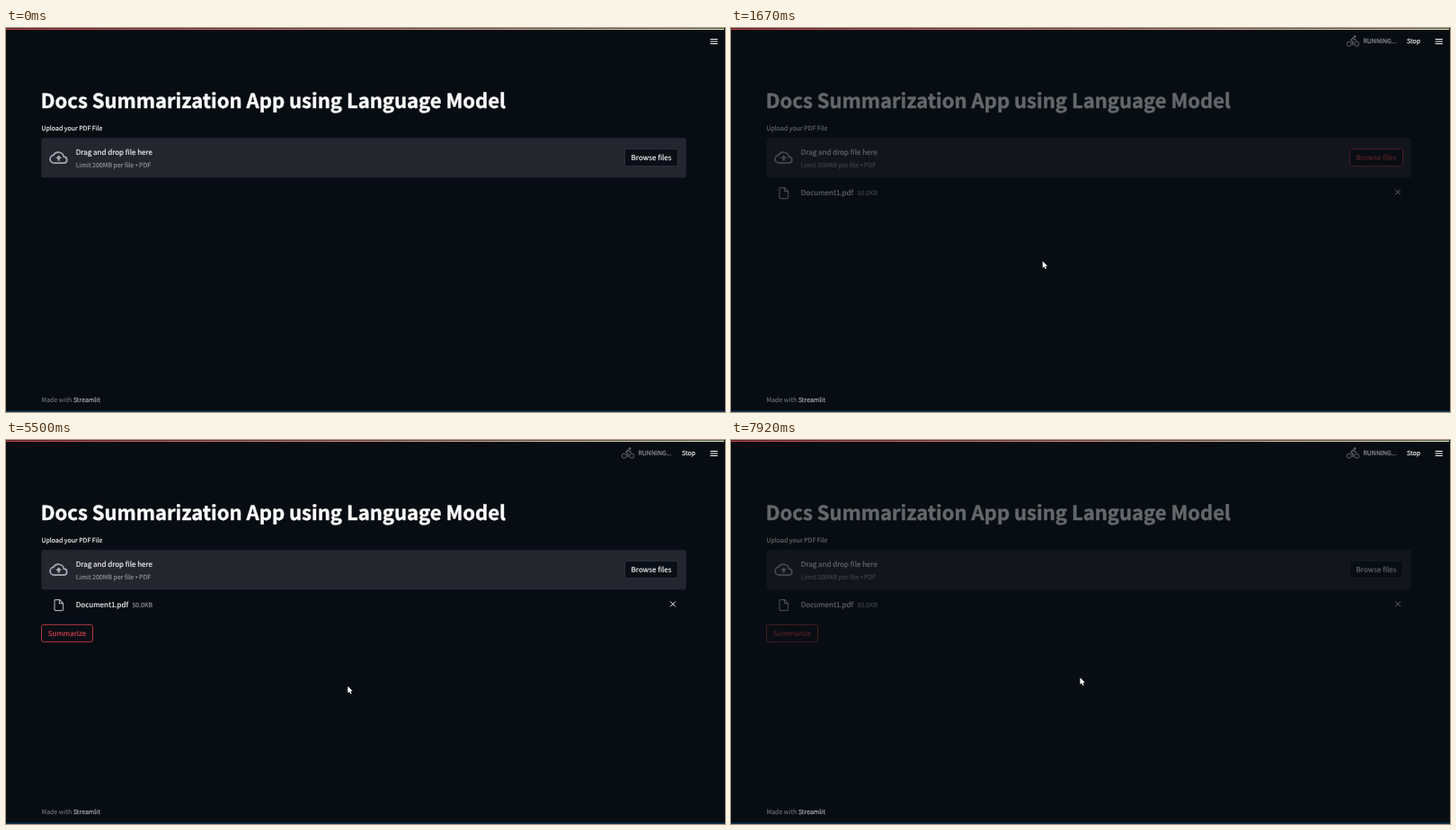
Write an HTML page with a canvas that moves like this. It is 800 px wide and 427 px high and loops after 8000 ms.

```html
<!DOCTYPE html>
<html lang="en">
<head>
<meta charset="utf-8">
<title>Docs Summarization App</title>
<style>
  html, body { margin: 0; width: 100%; height: 100%; overflow: hidden; background: #080d13; }
  canvas { display: block; width: 800px; height: 427px; }
</style>
</head>
<body>
<canvas id="stage" width="800" height="427"></canvas>
<script>
const ctx = document.getElementById('stage').getContext('2d');
const LOOP = 8000;
const FAMILY = '"Noto Sans CJK JP", "Noto Sans CJK SC", "Noto Sans CJK KR", "Noto Sans CJK", "Open Sans", sans-serif';
const BG = '#080d13', WHITE = '#fafafa', MUTED = '#96989d', RED = '#d8434a', ICON = '#a6a9b0', SPORT = '#6c6e73';
const BODY = 8.03, SMALL = 6.99, TITLE = 22.03;

// Times in ms
const FOCUS = 330, UPLOADED = 860, READY = 3540, HOVER = 4260, CLICKED = 4700;

// Pointer keys: time, x, y
const POINTER = [
  [120, 640, 236], [330, 717, 147], [420, 717, 147], [740, 387, 211], [770, 387, 211],
  [930, 346.7, 259.2], [3700, 346.7, 259.2], [4270, 69, 215], [5150, 69, 215],
  [5460, 380.3, 273.8], [5560, 380.3, 273.8], [5980, 388.4, 264.3], [LOOP, 388.4, 264.3]
];

const clamp = v => Math.max(0, Math.min(1, v));
const progress = (t, from, to) => clamp((t - from) / (to - from));
const smooth = k => k * k * (3 - 2 * k);

// A hairline outline gives the letters a slightly heavier weight
function text(str, x, y, size, color, { weight = 400, align = 'left' } = {}) {
  ctx.font = `${weight} ${size}px ${FAMILY}`;
  ctx.textAlign = align;
  ctx.fillStyle = ctx.strokeStyle = color;
  ctx.lineWidth = size * 0.02;
  ctx.lineJoin = 'round';
  ctx.fillText(str, x, y);
  ctx.strokeText(str, x, y);
}

function dot(x, y, r, color) {
  ctx.fillStyle = color;
  ctx.beginPath();
  ctx.arc(x, y, r, 0, Math.PI * 2);
  ctx.fill();
}

function box(x, y, w, h, fill, border) {
  ctx.beginPath();
  ctx.roundRect(x, y, w, h, 2.2);
  ctx.fillStyle = fill;
  ctx.fill();
  if (border) {
    ctx.lineWidth = 0.8;
    ctx.strokeStyle = border;
    ctx.stroke();
  }
}

function button(label, x, y, w, active) {
  box(x, y, w, 19, '#0a0f16', active ? RED : '#34363e');
  text(label, x + w / 2, y + 12.7, BODY, active ? RED : WHITE, { align: 'center' });
}

// Draws stroked and filled paths in icon units
function icon(x, y, scale, color, width, lines, solid) {
  ctx.save();
  ctx.translate(x, y);
  ctx.scale(scale, scale);
  ctx.lineJoin = 'miter';
  ctx.lineWidth = width;
  ctx.strokeStyle = ctx.fillStyle = color;
  ctx.stroke(new Path2D(lines));
  if (solid) ctx.fill(new Path2D(solid));
  ctx.restore();
}

function runner() {
  icon(685.2, 7.5, 0.6, SPORT, 2,
    'M6 12.6V8.5L11 6.5l1.5.2 1.8 2.8c1 1.5 2.7 2.4 4.7 2.4M11.8 7l-1.5 6.5-1.2 6.7-6-1.2M10.8 13l3.2 3v7');
  dot(693.3, 9.6, 1.25, SPORT);
}

function cyclist() {
  icon(684.8, 7.5, 0.6, SPORT, 1.9,
    'M19 10c-2 0-3.4-.8-4.4-1.8L12.2 6 8.5 9.8l3.5 3.4V19');
  icon(684.8, 7.5, 0.6, SPORT, 1.5,
    'M9.2 17a4.2 4.2 0 1 1-8.4 0 4.2 4.2 0 1 1 8.4 0zM23.2 17a4.2 4.2 0 1 1-8.4 0 4.2 4.2 0 1 1 8.4 0z');
  dot(694.1, 9.6, 1.25, SPORT);
}

function header(t) {
  const grad = ctx.createLinearGradient(0, 0, 800, 0);
  grad.addColorStop(0, '#c0444c');
  grad.addColorStop(0.5, '#c98f80');
  grad.addColorStop(1, '#d6dfb4');
  ctx.fillStyle = grad;
  ctx.fillRect(0, 0.6, 799, 1.4);

  ctx.fillStyle = WHITE;
  for (const y of [12, 14.5, 17]) ctx.fillRect(783.6, y, 8.2, 1);

  const start = t >= CLICKED ? CLICKED : t >= UPLOADED && t < READY ? UPLOADED : null;
  if (start === null) return;
  if ((t - start) % 1200 < 600) runner(); else cyclist();
  text('RUNNING...', 703.4, 17.4, SMALL, '#989a9f');
  text('Stop', 752, 17.4, SMALL, WHITE);
}

function uploader(t) {
  text('Docs Summarization App using Language Model', 38.8, 89.3, TITLE, WHITE, { weight: 700 });
  text('Upload your PDF File', 39.5, 113.5, SMALL, WHITE);

  box(39.4, 122.2, 717.3, 44.3, '#25252e');
  icon(48.2, 133.6, 0.87, ICON, 2,
    'M19 19H6a5 5 0 0 1-.6-9.96 7 7 0 0 1 13.1 2 4 4 0 0 1 .5 7.96z',
    'M8 13h2.55v3h2.9v-3H16l-4-4z');
  text('Drag and drop file here', 77.8, 141.4, BODY, WHITE);
  text('Limit 200MB per file', 77.8, 154.8, SMALL, MUTED);
  dot(145.3, 152.5, 1.1, MUTED);
  text('PDF', 148.1, 154.8, SMALL, MUTED);
  button('Browse files', 688.5, 134.6, 59, t >= FOCUS && t < CLICKED);
}

function fileRow() {
  icon(53.4, 177, 1, ICON, 1.2, 'M6.4.7H1.8Q.6.7.6 1.9V11.4Q.6 12.6 1.8 12.6H8.9Q10.1 12.6 10.1 11.4V4.4zM6.1.8V4.7H10');
  text('Document1.pdf', 77.8, 185.9, BODY, WHITE);
  text('50.0KB', 140.4, 185.6, SMALL, MUTED);
  icon(742, 182.5, 1, WHITE, 1, 'M-2.9-2.9L2.9 2.9M2.9-2.9L-2.9 2.9');
}

// Share by which stale content is faded
function staleness(t) {
  if (t < READY + 200) return smooth(progress(t, 1000, 1560)) * (1 - progress(t, READY, READY + 160));
  return smooth(progress(t, 5510, 6100));
}

function pointer(t) {
  const i = POINTER.findIndex(key => key[0] > t);
  if (i < 1) return;
  const [t0, x0, y0] = POINTER[i - 1], [t1, x1, y1] = POINTER[i];
  const k = smooth(progress(t, t0, t1));
  const arrow = new Path2D('M0 0V7.6L1.8 6 3 8.8 4.3 8.2 3.1 5.5H5.5z');
  ctx.save();
  ctx.translate(x0 + (x1 - x0) * k, y0 + (y1 - y0) * k);
  ctx.lineWidth = 0.9;
  ctx.strokeStyle = '#000';
  ctx.stroke(arrow);
  ctx.fillStyle = '#fff';
  ctx.fill(arrow);
  ctx.restore();
}

function draw(t) {
  ctx.globalAlpha = 1;
  ctx.textBaseline = 'alphabetic';
  ctx.textRendering = 'geometricPrecision';
  ctx.fillStyle = BG;
  ctx.fillRect(0, 0, 800, 427);

  uploader(t);
  if (t >= UPLOADED) fileRow();
  if (t >= READY) button('Summarize', 39.5, 205.4, 57, t >= HOVER);

  ctx.globalAlpha = 0.62 * staleness(t);
  ctx.fillStyle = BG;
  ctx.fillRect(0, 40, 800, 340);
  ctx.globalAlpha = 1;

  header(t);
  text('Made with', 39.5, 416.1, SMALL, '#6c6f74');
  text('Streamlit', 74.9, 416.1, SMALL, '#b4b6b9');
  ctx.fillStyle = '#0c3353';
  ctx.fillRect(0, 425.5, 800, 1.5);
  pointer(t);
}

function tick() {
  draw(performance.now() % LOOP);
  requestAnimationFrame(tick);
}
tick();
</script>
</body>
</html>
```
